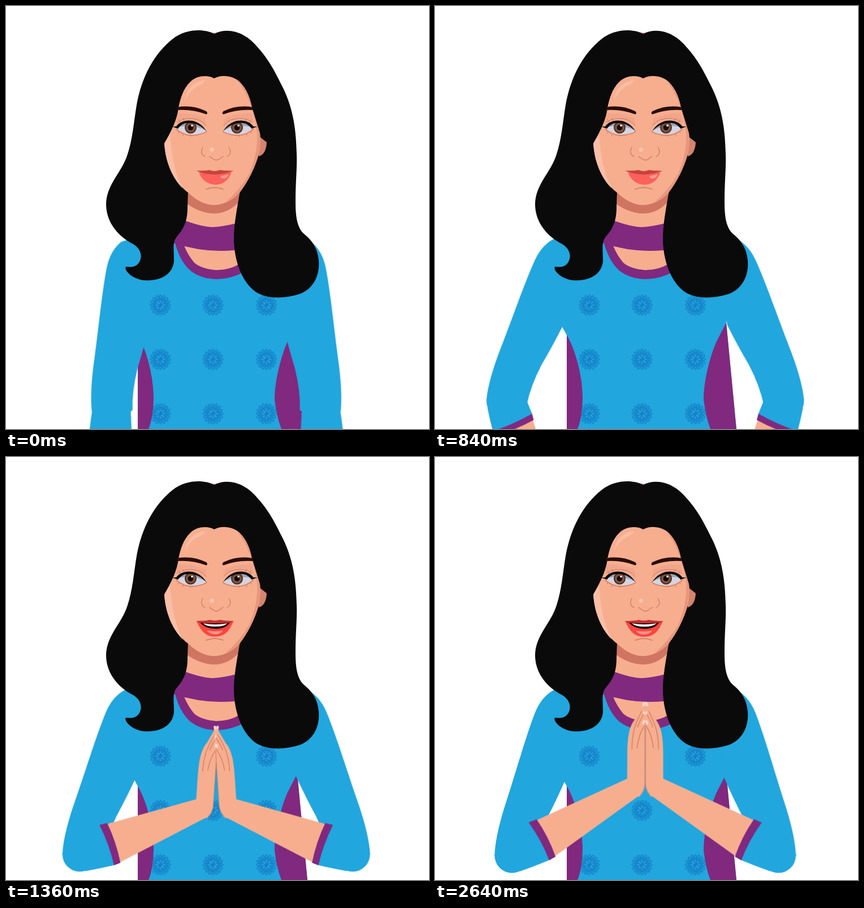
Recreate the animation shown at these times as an HTML page without scripts. Size 748x748 px, loop 4040 ms.

```html
<!DOCTYPE html>
<html lang="en">
<head>
<meta charset="utf-8">
<title>Greeting</title>
<style>
html, body { margin: 0; width: 100%; height: 100%; overflow: hidden; background: #fff; }
svg { display: block; width: 100%; height: 100%; }
.skin { fill: #f7ae8f; }
.blue { fill: #21a6de; }
.plum { fill: #80297f; }
.line { fill: none; stroke: #cc7a63; stroke-linecap: round; }

.upper, .elbow, .stretch, .hand { animation: 4040ms linear infinite; }
.upper { animation-name: upper; transform-origin: 235px 450px; }
.elbow { animation-name: elbow; }
.stretch { animation-name: stretch; }
.hand { animation-name: hand; }
@keyframes upper {
  0% { transform: rotate(-10.2deg); }
  12.13% { transform: rotate(-10.2deg); animation-timing-function: ease-in-out; }
  25.99% { transform: rotate(8.8deg); }
  30.69% { transform: rotate(4.1deg); animation-timing-function: ease-out; }
  36.63%, 100% { transform: rotate(0deg); }
}
@keyframes elbow {
  0% { transform: rotate(95deg); }
  12.13% { transform: rotate(95deg); animation-timing-function: ease-in-out; }
  25.99% { transform: rotate(48deg); }
  30.69% { transform: rotate(-6deg); animation-timing-function: ease-out; }
  36.63%, 100% { transform: rotate(-30deg); }
}
@keyframes stretch {
  0%, 25.99% { transform: scaleX(.75); }
  30.69% { transform: scaleX(.79); animation-timing-function: ease-out; }
  36.63%, 100% { transform: scaleX(1); }
}
@keyframes hand {
  0%, 25.99% { transform: translate(186px, 3px) rotate(14deg) scale(.94); }
  30.69% { transform: translate(196px, 3px) rotate(14deg) scale(.94); animation-timing-function: ease-out; }
  36.63%, 100% { transform: translate(248px, 3px) rotate(30deg) scale(1); }
}

.half, .closed, .shut, .open { animation: 4040ms step-end infinite; }
.half { animation-name: half; }
.closed { animation-name: closed; }
.shut { animation-name: shut; }
.open { animation-name: open; }
.talk { animation: talk 4040ms linear infinite; transform-origin: 369.5px 290px; }
@keyframes half {
  0%, 23.76%, 25.74%, 45.54%, 47.52%, 63.36%, 65.34%, 100% { opacity: 0; }
  22.77%, 24.75%, 44.55%, 46.53%, 62.37%, 64.35% { opacity: 1; }
}
@keyframes closed {
  0%, 24.75%, 46.53%, 64.35%, 100% { opacity: 0; }
  23.76%, 45.54%, 63.36% { opacity: 1; }
}
@keyframes shut { 0% { opacity: 1; } 27.72%, 100% { opacity: 0; } }
@keyframes open { 0% { opacity: 0; } 27.72%, 100% { opacity: 1; } }
@keyframes talk {
  0%, 27.72% { transform: scale(.93, .85); }
  30.69% { transform: scale(.96, .97); }
  36.63%, 100% { transform: scale(1); }
}
</style>
</head>
<body>
<svg viewBox="0 0 748 748">
<defs>
  <ellipse id="petal" rx="4" ry="18.5"/>
  <ellipse id="leaf" rx="3" ry="10"/>
  <g id="cross"><use href="#petal"/><use href="#petal" transform="rotate(90)"/></g>
  <g id="star"><use href="#leaf"/><use href="#leaf" transform="rotate(45)"/><use href="#leaf" transform="rotate(90)"/><use href="#leaf" transform="rotate(135)"/></g>
  <g id="flower" fill="#1b97d6" stroke="#1580c6" stroke-width="1">
    <use href="#cross"/><use href="#cross" transform="rotate(22.5)"/>
    <use href="#cross" transform="rotate(45)"/><use href="#cross" transform="rotate(67.5)"/>
    <circle r="12" fill="#1989cc"/>
    <use href="#star" fill="#21a0dc"/>
    <circle r="2.5" fill="#1580c6"/>
  </g>
  <g id="row"><use href="#flower" x="273"/><use href="#flower" x="366"/><use href="#flower" x="460.5"/></g>

  <g id="sleeve" class="blue">
    <path d="M240 408L210 412C196 420 185 432 177 452C161 492 141 565 122 622C112 655 105.500 685 105.500 706L136 720L177 709Q182 675 199 637Q218 600 233 565L246 480Z"/>
    <circle cx="136" cy="705" r="30.500"/>
  </g>
  <g id="forearm">
    <path class="blue" d="M0 -38L57 -36Q61 3 55 40Q24 36 -2 31Z"/>
    <path class="skin" d="M64 -33L245 -16Q258 3 252 20L64 39Z"/>
    <path class="plum" d="M55 -36L70 -34Q73 3 66 40L53 40Q59 3 55 -36Z"/>
  </g>
  <g id="palm">
    <path class="skin" d="M-12.500 -15C-12 -40 -13 -60 -11.500 -80C-10 -100 -5 -112 0 -118L14 -146C16 -151 19.500 -152 19.500 -147L19 -5C19 5 14 13 9 17L-6 14Z"/>
    <path class="line" d="M13 -134Q2 -112 -1 -98Q-4 -84 -4 -67M18 -108Q8 -94 5 -69M18 -131Q10 -118 6 -106" stroke="#d9826c" stroke-width="1.300"/>
    <path class="line" d="M19 -104V-5Q18 6 11 14" stroke="#d9826c" stroke-width="1"/>
    <ellipse cx="17" cy="-146.500" rx="2.200" ry="4" fill="#fbdcd3" transform="rotate(16 17 -146.500)"/>
    <ellipse cx="17.500" cy="-131" rx="1.600" ry="3" fill="#fbdcd3"/>
    <ellipse cx="17" cy="-114.500" rx="2.200" ry="4" fill="#fbdcd3" transform="rotate(16 17 -114.500)"/>
  </g>

  <g id="white">
    <path d="M301 215Q312 204 327 204Q342 206 355 221Q343 227 328 227Q312 226 301 215Z" fill="#d3d5e2"/>
    <path d="M301 215Q312 204 327 204Q342 206 355 221Q330 207 301 215Z" fill="#a0a3b5"/>
  </g>
  <g id="iris">
    <circle r="10.500" fill="#4a2c22"/>
    <circle r="8.500" fill="#80543f"/>
    <circle r="4.800" fill="#120a08"/>
    <circle cx="2.500" cy="-3.500" r="1.800" fill="#fff"/>
  </g>
  <g id="lashes">
    <path d="M294 213L301 213C308 203 323 200 336 205C346 209 351 216 355 222C346 213 338 208 326 207C316 206 309 210 304 217Z" fill="#0b0808"/>
    <path class="line" d="M303 206Q317 195 340 201Q349 205 353 211" stroke="#8a4a3c" stroke-width="1"/>
    <path class="line" d="M301 218Q313 229 330 229Q346 228 355 222" stroke="#b0604f" stroke-width="1.500"/>
    <path class="line" d="M308 206L305 201M315 203L313 198.500M306 222L304 225M314 226L312 230M326 228V231" stroke="#5c2a22" stroke-width="1"/>
  </g>
  <g id="lid-half">
    <path d="M299 214C308 200 323 199 336 203C346 208 351 215 355 221Q328 212 299 214Z" fill="#eba286"/>
    <path d="M295 213Q328 207 355 221Q328 215 295 213Z" fill="#0b0808" stroke="#0b0808" stroke-width="1.500"/>
  </g>
  <g id="lid-closed">
    <path d="M296 213C308 199 323 198 336 202C347 207 352 215 356 221Q342 230 327 230Q309 229 296 213Z" fill="#eea68a"/>
    <path d="M295 213Q308 224 327 225Q343 225 355 221Q343 229 327 229Q307 227 295 213Z" fill="#0b0808"/>
  </g>
  <path id="brow" d="M302 179Q329 174 354 186Q358 190 354 191.500Q330 182 302 184Z" fill="#2a0d0a"/>
</defs>

<!-- torso -->
<path class="blue" d="M228 415L300 405H410L520 420L530 480L515 560L533 748H233V582L222 562L205 480Z"/>
<use href="#row" y="529"/><use href="#row" y="625"/><use href="#row" y="721"/>
<path class="plum" d="M233 582C246 603 261 650 261 695Q260 730 252 748H233Z"/>
<path class="plum" d="M515 560L498 593C488 615 475 660 475 695Q478 725 487 748H533Z"/>

<!-- neck and collar -->
<path class="skin" d="M319 320H414L406 400H310Z"/>
<path d="M319 325H414L411 347Q393 367 367 367Q343 366 319 349Z" fill="#cf7562"/>
<path class="plum" d="M298 415Q306 450 326 468Q346 483 373 483Q396 483 420 471L410 425Z"/>
<path class="skin" d="M315 424Q360 436 404 431L413 456Q395 467 372 467Q346 465 333 454Q322 441 315 424Z"/>
<path class="plum" d="M315 379Q348 391 366 391Q384 390 408 384L404 432Q350 437 296 419Z"/>

<!-- arms -->
<g class="upper">
  <use href="#sleeve"/>
  <g transform="translate(136 705)"><g class="elbow">
    <g class="stretch"><use href="#forearm"/></g>
    <g class="hand"><use href="#palm"/></g>
  </g></g>
</g>
<g transform="matrix(-1 0 0 1 743.500 0)"><g class="upper">
  <use href="#sleeve"/>
  <g transform="translate(136 705)"><g class="elbow">
    <g class="stretch"><use href="#forearm"/></g>
    <g class="hand"><use href="#palm"/></g>
  </g></g>
</g></g>

<!-- hair -->
<path fill="#0a0a0a" d="M368 49C350 40 318 40 295 58C262 84 240 125 231 175C226 205 224 235 215 262C205 295 177 315 177 352C178 385 200 408 225 421C237 428 243 442 235 454C229 462 222 462 212 461C208 466 222 483 245 485C275 487 296 473 297 450C297 430 294 418 302 408C316 392 321 378 321 355L322 326H414C410 350 404 380 403 405C402 440 412 480 437 502C455 518 490 519 520 509C545 499 555 475 553 450C551 425 538 412 526 402C514 390 512 370 512 345C512 310 515 285 514 262C513 215 507 180 490 145C475 115 465 95 445 73C425 48 395 36 368 49Z"/>
<circle cx="368" cy="48.500" r="1.200" fill="#c8342c"/>

<!-- face -->
<path d="M447 230L461 241Q460 262 447 266Z" fill="#d5846d"/>
<path class="skin" d="M368 128C358 122 338 122 326 134C313 146 308 165 305 180C303 200 292 222 280 243C282 280 298 312 322 330Q345 352 369 352Q395 350 413 330Q436 300 447 262C450 250 450 235 449 225L435 180C431 158 422 140 408 130C395 122 379 122 368 128Z"/>
<path d="M408 130C422 140 431 158 435 180L449 225C450 235 450 250 447 262Q436 300 413 330Q402 342 388 347Q412 327 430 297Q446 260 444 224Q436 165 408 130Z" fill="#e8977d"/>
<path d="M290 226L280 243C282 275 294 304 312 322Q293 285 290 226Z" fill="#f9bfa6"/>
<path d="M317 166C319 148 330 134 352 131Q350 138 338 142Q325 149 317 166Z" fill="#f9bda3"/>
<path d="M304 190Q328 188 352 198L356 214Q344 201 326 200Q310 200 300 208ZM435 190Q411 188 387 198L383 214Q395 201 413 200Q429 200 439 208Z" fill="#f1a58a"/>
<circle cx="364" cy="254" r="3.500" fill="#fbc7b1"/>
<path class="line" d="M348 250Q342 262 352 266M394 250Q401 261 391 266M360 266Q364 269 367 271Q372 274 377 271Q380 268 384 266" stroke-width="1.300"/>
<path class="line" d="M354 324Q369 318 384 324" stroke-width="1.400"/>

<!-- eyes -->
<use href="#brow"/><use href="#brow" transform="matrix(-1 0 0 1 738.500 0)"/>
<use href="#white"/><use href="#white" transform="matrix(-1 0 0 1 738.500 0)"/>
<use href="#iris" x="326.500" y="215"/><use href="#iris" x="408.500" y="215"/>
<use href="#lashes"/><use href="#lashes" transform="matrix(-1 0 0 1 738.500 0)"/>
<g class="half"><use href="#lid-half"/><use href="#lid-half" transform="matrix(-1 0 0 1 738.500 0)"/></g>
<g class="closed"><use href="#lid-closed"/><use href="#lid-closed" transform="matrix(-1 0 0 1 738.500 0)"/></g>

<!-- mouth -->
<g class="shut">
  <path d="M341 294Q370 300 399 293Q391 316 370 316Q349 315 341 294Z" fill="#fc615b"/>
  <path d="M336 291Q350 292 360 290Q369 294 378 290Q390 292 403 291Q386 298 369 298Q350 298 336 291Z" fill="#c8423c"/>
  <path d="M379 301Q388 299 394 297Q391 306 384 305Q379 304 379 301Z" fill="#ff9a90"/>
</g>
<g class="open"><g class="talk">
  <path d="M336 290Q353 290 361 288Q369 291 378 288Q388 290 403 290C396 306 389 318 369 318C350 318 343 304 336 290Z" fill="#fa463f"/>
  <path d="M336 290Q353 290 361 288Q369 291 378 288Q388 290 403 290L395 295Q370 292 345 295Z" fill="#c9302c"/>
  <path d="M343 293Q370 295 396 293Q389 304 370 304Q351 303 343 293Z" fill="#160706"/>
  <path d="M348 294Q370 298 392 294Q386 300 370 300Q354 300 348 294Z" fill="#fff"/>
  <path d="M355 307Q369 310 384 307Q379 314 369 314Q359 313 355 307Z" fill="#ff938b"/>
</g></g>
</svg>
</body>
</html>
```
